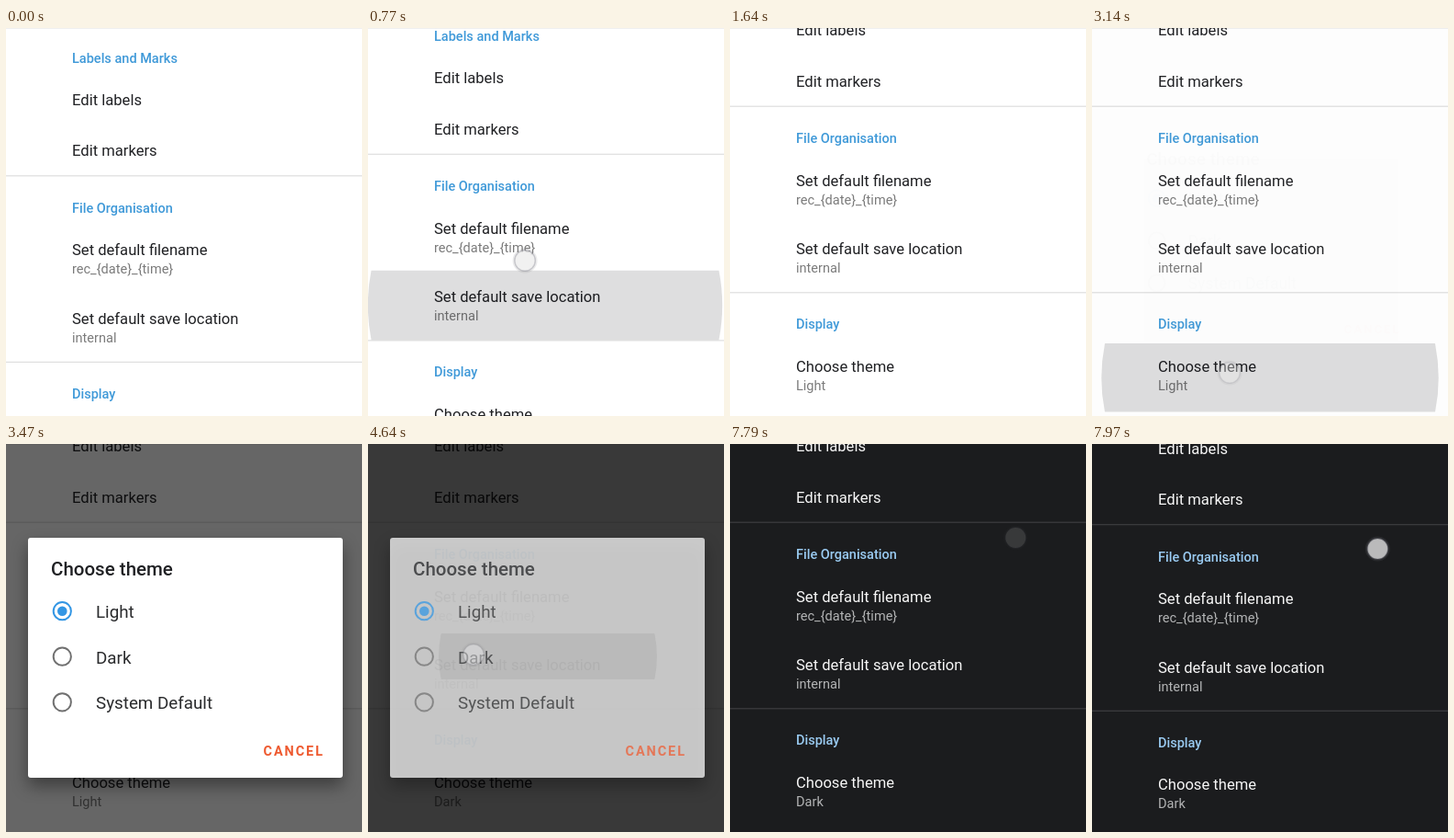
An HTML page with a canvas that plays this animation: 388 by 422 pixels, repeating every 8000 ms.

```html
<!DOCTYPE html>
<html lang="en">
<head>
<meta charset="utf-8">
<title>Theme settings</title>
<style>
html, body { margin: 0; width: 100%; height: 100%; overflow: hidden; background: #fff; }
canvas { display: block; width: 388px; height: 422px; }
</style>
</head>
<body>
<canvas id="stage"></canvas>
<script>
const W = 388, H = 422, LOOP = 8000, MAX_SCROLL = 75.6;
const canvas = document.getElementById('stage');
const ctx = canvas.getContext('2d');
const dpr = window.devicePixelRatio || 1;
canvas.width = W * dpr;
canvas.height = H * dpr;

const LIGHT = { bg: '#ffffff', title: '#202124', note: '#7b7b7b', head: '#3f99d8', line: '#dedede', top: '#efefef' };
const DARK = { bg: '#1b1c1e', title: '#f7f7f7', note: '#b3b4b5', head: '#9acbf2', line: '#3d3e40', top: '#1b1c1e' };

const HEADS = [['Labels and Marks', 38], ['File Organisation', 201], ['Display', 403]];
const TITLES = [['Edit labels', 84], ['Edit markers', 139.3], ['Set default filename', 247.3],
  ['Set default save location', 322], ['Choose theme', 449.4]];
const NOTES = [['rec_{date}_{time}', 267.2], ['internal', 342]];
const OPTIONS = [['Light', 181.7], ['Dark', 231.2], ['System Default', 280.8]];

const clamp = v => Math.max(0, Math.min(1, v));
const span = (t, a, b) => clamp((t - a) / (b - a));
const smooth = u => u * u * (3 - 2 * u);
const easeOut = u => 1 - (1 - u) * (1 - u);
const mix = (a, b, u) => a + (b - a) * u;

function text(str, x, y, size, color, weight = 400, spacing = 0) {
  ctx.font = `${weight} ${size}px Roboto, sans-serif`;
  ctx.letterSpacing = spacing + 'px';
  ctx.fillStyle = color;
  ctx.fillText(str, x, y);
}

function disc(x, y, r, fill) {
  ctx.beginPath();
  ctx.arc(x, y, r, 0, 2 * Math.PI);
  ctx.fillStyle = fill;
  ctx.fill();
}

function ring(x, y, r, width, color) {
  ctx.beginPath();
  ctx.arc(x, y, r, 0, 2 * Math.PI);
  ctx.lineWidth = width;
  ctx.strokeStyle = color;
  ctx.stroke();
}

// A growing disc clipped to its row
function ripple(x, y, w, h, cx, cy, r, alpha) {
  if (alpha <= 0) return;
  ctx.save();
  ctx.beginPath();
  ctx.rect(x, y, w, h);
  ctx.clip();
  disc(cx, cy, r, `rgba(0,0,12,${alpha})`);
  ctx.restore();
}

function touch(x, y, alpha) {
  if (alpha <= 0) return;
  ctx.save();
  ctx.globalAlpha *= alpha;
  ring(x, y, 12.3, 2.4, 'rgba(120,120,125,.15)');
  disc(x, y, 11, 'rgba(236,236,237,.76)');
  ring(x, y, 11.2, 1.4, 'rgba(125,125,135,.36)');
  ctx.restore();
}

function page(theme, scroll, choice) {
  ctx.fillStyle = theme.bg;
  ctx.fillRect(0, 0, W, H);
  ctx.fillStyle = theme.top;
  ctx.fillRect(0, 0, W, 1);
  ctx.fillStyle = theme.line;
  for (const y of [160.2, 362.8]) ctx.fillRect(0, y - scroll, W, 1.2);
  for (const [s, y] of HEADS) text(s, 72, y - scroll, 14.5, theme.head, 500);
  for (const [s, y] of TITLES) text(s, 72, y - scroll, 16.6, theme.title);
  for (const [s, y] of [...NOTES, [choice, 469.2]]) text(s, 72, y - scroll, 14.55, theme.note);
}

function dialog(t) {
  ctx.save();
  ctx.shadowColor = 'rgba(0,0,0,.4)';
  ctx.shadowBlur = 18 * dpr;
  ctx.shadowOffsetY = 9 * dpr;
  ctx.fillStyle = '#fff';
  ctx.beginPath();
  ctx.roundRect(24, 102, 343, 261, 3);
  ctx.fill();
  ctx.restore();
  const r = mix(20, 118, easeOut(span(t, 4500, 4640))) + 110 * span(t, 4640, 4760);
  ripple(24, 206, 343, 50, 196, 231, r, 0.085 * span(t, 4490, 4560));
  text('Choose theme', 49, 143, 20.5, '#202124', 500);
  OPTIONS.forEach(([label, y], i) => {
    ring(61.3, y, 9.6, 2, i ? '#707070' : '#3396e4');
    if (!i) disc(61.3, y, 5.3, '#3396e4');
    text(label, 98, y + 7.4, 18.8, '#2a2b2d');
  });
  text('CANCEL', 280.5, 339, 14.5, '#ee5a30', 700, 1.9);
}

function firstDrag(t) {
  const u = smooth(span(t, 632, 1150));
  return { x: mix(167, 190, u), y: mix(289, 86, u) };
}

function scrollAt(t) {
  if (t > 7790) return MAX_SCROLL - 2.5 * smooth(span(t, 7880, 7975));
  return Math.max(0, Math.min(MAX_SCROLL, 276.5 - firstDrag(t).y));
}

function draw(t) {
  ctx.setTransform(dpr, 0, 0, dpr, 0, 0);
  ctx.globalAlpha = 1;
  const scroll = scrollAt(t);
  const toDark = smooth(span(t, 4650, 4830));

  page(LIGHT, scroll, t < 4600 ? 'Light' : 'Dark');

  const grow = easeOut(span(t, 560, 770));
  ripple(0, 287.3 - scroll, W, 75.5, 193, 325 - scroll, mix(50, 193, grow) + 10 * span(t, 770, 830),
    0.13 * span(t, 540, 620) * (1 - span(t, 790, 1010)));
  ripple(0, 418.5 - scroll, W, 74.5, 194, 456 - scroll, mix(40, 205, easeOut(span(t, 3000, 3220))),
    0.13 * span(t, 2990, 3060) * (1 - span(t, 3200, 3380)));

  const dim = mix(0.6, 0.775, span(t, 4570, 4640)) * smooth(span(t, 3130, 3310));
  if (dim > 0 && toDark < 1) {
    ctx.fillStyle = `rgba(0,0,0,${dim})`;
    ctx.fillRect(0, 0, W, H);
  }
  if (toDark > 0) {
    ctx.globalAlpha = toDark;
    page(DARK, scroll, 'Dark');
    ctx.globalAlpha = 1;
  }

  const open = easeOut(span(t, 3140, 3300));
  const shown = open * (1 - 0.265 * span(t, 4570, 4640)) * (1 - smooth(span(t, 4645, 4790)));
  if (shown > 0) {
    const k = mix(0.93, 1, open);
    ctx.save();
    ctx.globalAlpha = shown;
    ctx.translate(195.5, 232.5);
    ctx.scale(k, k);
    ctx.translate(-195.5, -232.5);
    dialog(t);
    ctx.restore();
  }

  const finger = firstDrag(t);
  touch(finger.x, finger.y, span(t, 490, 560) * (1 - span(t, 1150, 1310)));
  touch(150, 375, span(t, 2950, 3010) * (1 - span(t, 3080, 3200)));
  touch(115, 229, span(t, 4450, 4510) * (1 - 0.4 * span(t, 4570, 4640)) * (1 - span(t, 4640, 4740)));
  touch(311.3, mix(102, 114, smooth(span(t, 7830, 7975))), span(t, 7780, 7840));
}

const start = performance.now();
function tick() {
  draw((performance.now() - start) % LOOP);
  requestAnimationFrame(tick);
}
tick();
</script>
</body>
</html>
```
